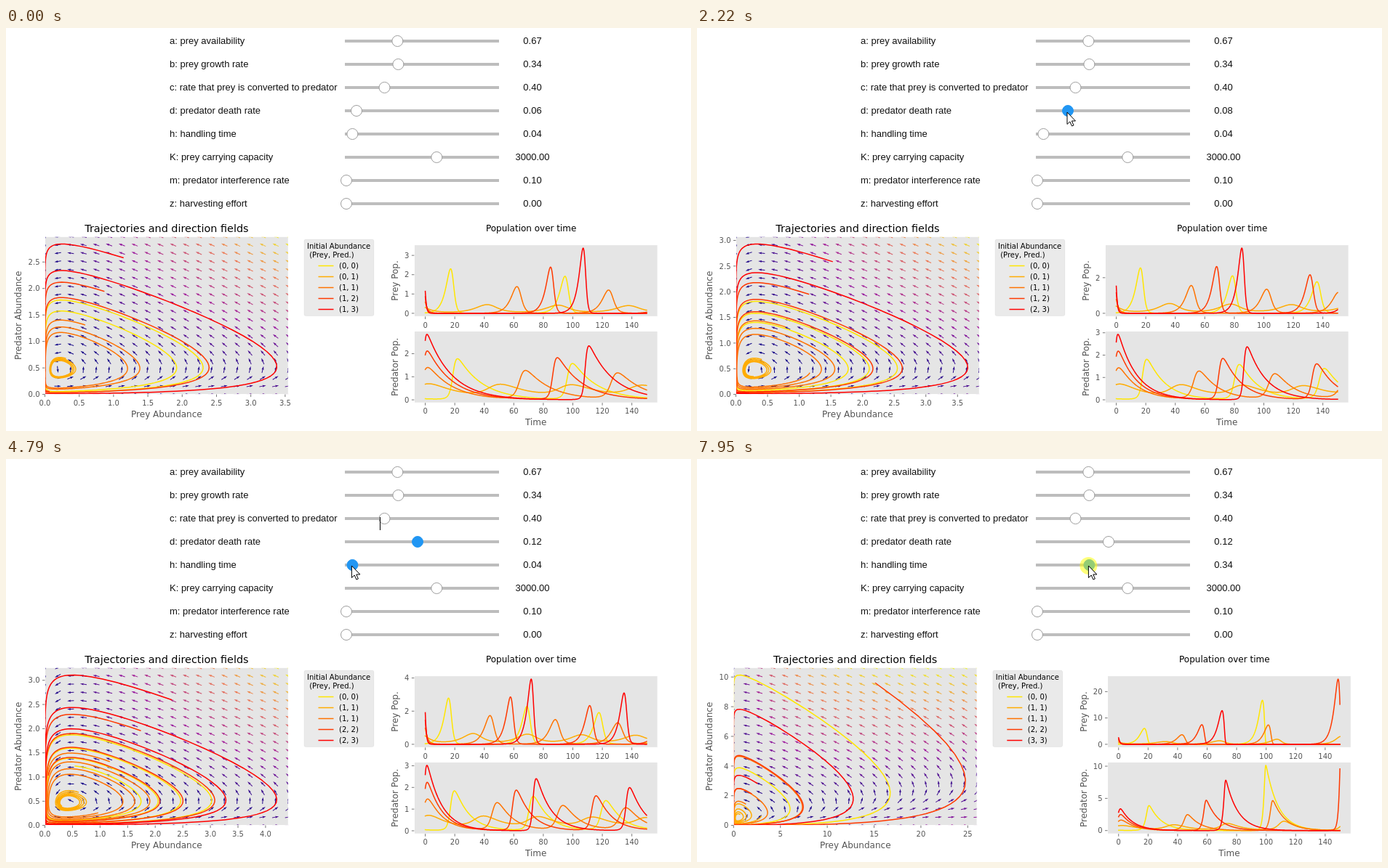
These frames come from a looping animation (942 by 555 pixels, 8000 ms). An HTML page:

```html
<!DOCTYPE html>
<html lang="en">
<head>
<meta charset="utf-8">
<title>Predator and prey explorer</title>
<style>
  html, body { margin: 0; width: 100%; height: 100%; overflow: hidden; background: #fff; }
  svg { display: block; }
  text { font: 10px "DejaVu Sans", sans-serif; fill: #555; }
  .ui text { font: 13px "Liberation Sans", Arial, sans-serif; fill: #111; }
  .black { fill: #000; }
  .label { font-size: 12px; }
  .title { font-size: 14.4px; }
  .mid { text-anchor: middle; }
  .end { text-anchor: end; }
  .thumb { fill: #fff; stroke: #9e9e9e; }
  .thumb.on { fill: #2196f3; stroke: #2196f3; }
</style>
</head>
<body>
<svg id="stage" width="942" height="555" viewBox="0 0 942 555">
  <g id="plots"></g>
  <g id="sliders" class="ui"></g>
  <path id="caret" d="M514.5 80v18" stroke="#000"/>
  <circle id="disc" r="12" fill="#ff0"/>
  <path id="cursor" d="M0 0V16.5L3.8 13 6.5 19 9 18 6.4 12H11.5Z" fill="#fff" stroke="#000"/>
</svg>
<script>
const $ = id => document.getElementById(id);
const LOOP = 8000, W = 334.8, H = 217.4, SUB = 98.8;
const text = (x, y, s, cls = '', extra = '') =>
  `<text x="${x}" y="${y}" class="${cls}" ${extra}>${s}</text>`;

// ---- model: prey x, predator y, ratio-dependent predation with interference m ----
const a = .67, b = .34, c = .4, K = 3000, m = .1;

function flow(x, y, { d, h }) {
  const eaten = a * x * y / (y ** m + a * h * x || 1);
  return [b * x * (1 - x / K) - eaten, c * eaten - d * y];
}

function equilibrium({ d, h }) {
  const y = (b * c / (a * (c - d * h))) ** (1 / (1 - m));
  return [d * y / (b * c), y];
}

function integrate(x, y, run) {
  const pts = [[0, x, y]], dt = .05;
  for (let i = 1; i <= 3000; i++) {
    const [p1, q1] = flow(x, y, run);
    const [p2, q2] = flow(x + p1 * dt / 2, y + q1 * dt / 2, run);
    const [p3, q3] = flow(x + p2 * dt / 2, y + q2 * dt / 2, run);
    const [p4, q4] = flow(x + p3 * dt, y + q3 * dt, run);
    x += dt * (p1 + 2 * p2 + 2 * p3 + p4) / 6;
    y += dt * (q1 + 2 * q2 + 2 * q3 + q4) / 6;
    if (i % 3 === 0) pts.push([i * dt, x, y]);
  }
  return pts;
}

function solve(run) {
  const [ex, ey] = equilibrium(run);
  const curves = [0, 1, 2, 3, 4].map(i => {
    const v = .1 + 5.35 * i / 4;
    return integrate(v * ex, v * ey, run);
  });
  const span = k => {
    const all = curves.flat().map(p => p[k]);
    return [Math.min(...all), Math.max(...all)];
  };
  return { ...run, curves, x: span(1), y: span(2) };
}

// ---- plotting ----
const color = i => `rgb(255,${Math.round(255 * (.9 - .225 * i))},0)`;
const heatStops = [[13, 8, 135], [156, 23, 158], [237, 121, 83], [240, 249, 33]];

function heat(v) {
  const i = Math.min(2, Math.floor(v * 3)), f = v * 3 - i;
  return `rgb(${heatStops[i].map((p, k) => Math.round(p + (heatStops[i + 1][k] - p) * f))})`;
}

function ticks([lo, hi], bins) {
  const raw = (hi - lo) / bins, mag = 10 ** Math.floor(Math.log10(raw));
  const step = mag * [1, 2, 2.5, 5, 10].find(s => s * mag >= raw - 1e-9);
  const list = [];
  for (let i = Math.ceil(lo / step); i * step <= hi; i++)
    list.push([i * step, (i * step).toFixed(step % 1 ? 1 : 0)]);
  return list;
}

const labelWidth = list =>
  Math.max(...list.map(([, s]) => 6.36 * s.length - (s.includes('.') ? 3.18 : 0)));

const padded = ([lo, hi], both) => {
  const pad = .05 * (hi - lo);
  return [both ? lo - pad : 0, hi + pad];
};

// Axes box with ticks; inner(px, py) returns what is clipped inside it.
function axes(left, top, h, xr, yr, yBins, yName, inner) {
  const px = v => (v - xr[0]) / (xr[1] - xr[0]) * W;
  const py = v => h - (v - yr[0]) / (yr[1] - yr[0]) * h;
  const bottom = top + h, yt = ticks(yr, yBins);
  let marks = '', labels = '';
  for (const [v, s] of ticks(xr, 9)) {
    marks += `M${left + px(v)} ${bottom}v3.5`;
    labels += text(left + px(v), bottom + 15.2, s, 'mid');
  }
  for (const [v, s] of yt) {
    marks += `M${left} ${top + py(v)}h-3.5`;
    labels += text(left - 7, top + py(v) + 3.7, s, 'end');
  }
  const nx = left - labelWidth(yt) - 16.1, ny = top + h / 2;
  return `<svg x="${left}" y="${top}" width="${W}" height="${h}">
      <rect width="100%" height="100%" fill="#e5e5e5"/>${inner(px, py)}</svg>
    <rect x="${left}" y="${top}" width="${W}" height="${h}" fill="none" stroke="#fff"/>
    <path d="${marks}" stroke="#555" stroke-width=".8"/>${labels}` +
    text(nx, ny, yName, 'label mid', `transform="rotate(-90 ${nx} ${ny})"`);
}

const lines = (curves, kx, ky, px, py) => curves.map((pts, i) =>
  `<polyline fill="none" stroke="${color(i)}" stroke-width="1.5" stroke-linejoin="round"
    stroke-linecap="square" points="${
    pts.map(p => px(p[kx]).toFixed(2) + ',' + py(p[ky]).toFixed(2)).join(' ')}"/>`).join('');

function arrows(run, xr, yr, px, py) {
  const field = [];
  for (let j = 0; j < 20; j++) for (let i = 0; i < 20; i++) {
    const x = xr[1] * i / 19, y = yr[1] * j / 19;
    const [u, v] = flow(x, y, run);
    field.push({ x, y, u, v, size: Math.hypot(u, v) });
  }
  const top = Math.max(...field.map(f => f.size));
  return field.slice(1).map(f =>
    `<path d="M-4.65-.5H.15L-.35-1.5 4.65 0-.35 1.5 .15.5H-4.65Z" fill="${heat(f.size / top)}"
      transform="translate(${px(f.x)} ${py(f.y)}) rotate(${Math.atan2(-f.v, f.u) * 180 / Math.PI})"/>`).join('');
}

function phasePlot(run) {
  const xr = padded(run.x), yr = padded(run.y);
  const left = run.left = 37.6 + labelWidth(ticks(yr, 9));
  const legend = run.curves.map((pts, i) => {
    const y = 327.5 + 15 * i;
    return `<path d="M${left + 376} ${y}h21" stroke="${color(i)}" stroke-width="1.5"/>` +
      text(left + 404.5, y + 3.7, `(${pts[0][1].toFixed(0)}, ${pts[0][2].toFixed(0)})`, 'black');
  }).join('');
  return axes(left, 287.2, H, xr, yr, 9, 'Predator Abundance',
    (px, py) => arrows(run, xr, yr, px, py) + lines(run.curves, 1, 2, px, py)) +
    text(left + W / 2, 281, 'Trajectories and direction fields', 'title black mid') +
    text(left + W / 2, 536, 'Prey Abundance', 'label mid') +
    `<rect x="${left + 356.7}" y="291.3" width="95.5" height="105" rx="2"
      fill="#eaeaea" stroke="#d6d6d6" stroke-width=".5"/>` +
    text(left + 360.5, 304, 'Initial Abundance', 'black') +
    text(left + 363.7, 315.7, '(Prey, Pred.)', 'black') + legend;
}

function timePlot(run) {
  const xr = [-7.5, 157.5], prey = padded(run.x, true), pred = padded(run.y, true);
  const left = Math.max(labelWidth(ticks(prey, 4)), labelWidth(ticks(pred, 4)));
  const part = (top, yr, k, name) => axes(left, top, SUB, xr, yr, 4, name,
    (px, py) => lines(run.curves, 0, k, px, py));
  return part(298.6, prey, 1, 'Prey Pop.') + part(417.4, pred, 2, 'Predator Pop.') +
    text(left + 160.8, 280, 'Population over time', 'label black mid') +
    text(left + W / 2, 547, 'Time', 'label mid');
}

// ---- interaction: each drag recomputes the plots after its release ----
const drags = [
  { id: 'd', to: .08, start: 1210, end: 1410, release: 1670, clears: true },
  { id: 'd', to: .1, start: 2400, end: 2640, release: 2930, clears: true },
  { id: 'd', to: .12, start: 3760, end: 4190, release: 4440 },
  { id: 'h', to: .146, start: 5260, end: 5360, release: 5640 },
  { id: 'h', to: .29, start: 6370, end: 6570, release: 6765, clears: true },
  { id: 'h', to: .34, start: 7850, end: 7950, release: 8200 }];
const PRESS = 150, CLEAR = 240, PHASE = 310, TIME = 550;

const initial = { d: .06, h: .04 }, states = [initial];
for (const { id, to } of drags) states.push({ ...states.at(-1), [id]: to });
const solved = states.slice(0, -1).map(solve);
$('plots').innerHTML = solved.map((run, i) =>
  `<g id="phase${i}">${phasePlot(run)}</g><g id="time${i}">${timePlot(run)}</g>`).join('');

// ---- sliders: name, value, min, max ----
const sliders = [
  ['a: prey availability', a, 0, 2],
  ['b: prey growth rate', b, 0, 1],
  ['c: rate that prey is converted to predator', c, .2, 1],
  ['d: predator death rate', initial.d, .05, .2],
  ['h: handling time', initial.h, 0, 1],
  ['K: prey carrying capacity', K, 100, 5000],
  ['m: predator interference rate', m, .1, 1],
  ['z: harvesting effort', 0, 0, 1]
].map(([name, value, min, max], i) => ({
  id: name[0], name, value, y: 18 + 32 * i,
  x: v => 468 + 210 * (v - min) / (max - min)
}));
const [dSlider, hSlider] = ['d', 'h'].map(id => sliders.find(s => s.id === id));

$('sliders').innerHTML = sliders.map(({ id, name, value, x, y }) =>
  text(225, y + 4, name) +
  `<rect x="466" y="${y - 2}" width="212" height="4" fill="#bdbdbd"/>
  <circle id="thumb-${id}" class="thumb" cx="${x(value)}" cy="${y}" r="7.5"/>` +
  text(724, y + 4, value.toFixed(2), 'mid', `id="value-${id}"`)).join('');

function setSlider({ id, x }, value, on) {
  const thumb = $('thumb-' + id);
  thumb.setAttribute('cx', x(value));
  thumb.classList.toggle('on', on);
  $('value-' + id).textContent = value.toFixed(2);
}

// ---- animation ----
const clamp = v => Math.max(0, Math.min(1, v));
const mix = (p, q, f) => p + (q - p) * f;
const ease = (t, from, to) => {
  const f = clamp((t - from) / (to - from));
  return f * f * (3 - 2 * f);
};
const valueAt = (id, t) => drags.filter(g => g.id === id)
  .reduce((v, g) => mix(v, g.to, ease(t, g.start, g.end)), initial[id]);
const show = (el, on) => el.style.display = on ? '' : 'none';

function draw(t) {
  const ready = delay => drags.filter(g => t >= g.release + delay).length;
  const cleared = drags.some(g => g.clears && t >= g.release + CLEAR && t < g.release + PHASE);
  const phase = ready(PHASE), time = ready(TIME);
  solved.forEach((run, i) => {
    show($('phase' + i), i === phase && !cleared);
    show($('time' + i), i === time);
  });
  const base = cleared ? 49.2 : solved[phase].left + 501.5;
  $('time' + time).setAttribute('transform', `translate(${base})`);

  const d = valueAt('d', t), h = valueAt('h', t);
  const hDrag = drags.find(g => g.id === 'h');
  setSlider(dSlider, Math.round(d * 100) / 100, t >= 640 && t < hDrag.start - PRESS);
  setSlider(hSlider, h, t >= 4740);

  // The pointer enters from the corner, follows the d thumb, then the h thumb.
  const enter = ease(t, 100, 660), cross = ease(t, 4490, 4740);
  const x = mix(mix(889, dSlider.x(d) - 1, enter), hSlider.x(h) - 1, cross);
  const y = mix(mix(547, dSlider.y + 2, enter), hSlider.y + 1, cross);
  for (const id of ['cursor', 'disc']) $(id).setAttribute('transform', `translate(${x} ${y})`);
  show($('cursor'), t >= 100);

  const glow = Math.max(...drags.map(g =>
    clamp(Math.min(t - g.start + PRESS, g.release + 50 - t) / 50)));
  $('disc').setAttribute('opacity', .52 * glow);
  show($('caret'), t > 1000 && (t + 745) % 1005 < 530);
}

const start = performance.now();
function tick() {
  draw((performance.now() - start) % LOOP);
  requestAnimationFrame(tick);
}
tick();
</script>
</body>
</html>
```
